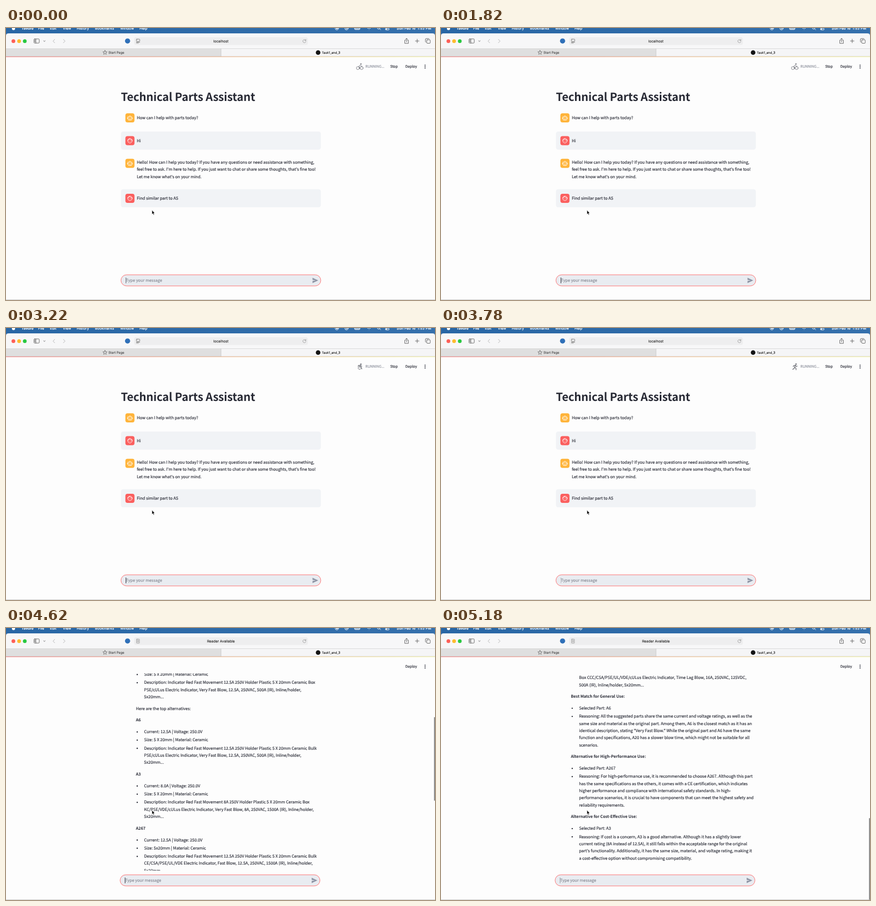
An HTML page for the animation above (5320 ms loop, 800 by 507 pixels).

```html
<!DOCTYPE html>
<html lang="en">
<head>
<meta charset="utf-8">
<title>Technical Parts Assistant</title>
<style>
  html, body { margin: 0; width: 100%; height: 100%; overflow: hidden; background: #fdfdfd; }
  svg { display: block; width: 100%; height: 100%; }
  text { white-space: pre; text-rendering: geometricPrecision; }
  .ui { font-family: Inter, "Liberation Sans", sans-serif; }
  .page { font-family: "Noto Sans CJK SC", "Noto Sans CJK JP", "Noto Sans", sans-serif; }
  .line { fill: none; stroke-linecap: round; stroke-linejoin: round; }
</style>
</head>
<body>
<svg id="stage" viewBox="0 0 800 507">
  <defs>
    <clipPath id="view"><rect x="0" y="84.5" width="797" height="367.8"/></clipPath>
    <linearGradient id="sky"><stop offset="0" stop-color="#2866a5"/><stop offset="1" stop-color="#3570ac"/></linearGradient>
    <linearGradient id="ribbon"><stop offset="0" stop-color="#ff4b4b"/><stop offset="1" stop-color="#fffd80"/></linearGradient>
    <g id="bot">
      <rect width="17" height="17" rx="4" fill="#ffb43a"/>
      <g class="line" stroke="#fff" stroke-width=".85">
        <path d="M5 6.2H12V11.2Q12 12.8 10.4 12.8H6.6Q5 12.8 5 11.2ZM8.5 6V4.2M3.7 8.3V10M13.3 8.3V10M7 11H10"/>
        <path d="M6.9 8.6h.1M10 8.6h.1" stroke-width="1.2"/>
      </g>
    </g>
    <g id="user">
      <rect width="17" height="17" rx="4" fill="#fb5f5e"/>
      <g class="line" stroke="#fff" stroke-width=".85">
        <circle cx="8.5" cy="8.7" r="4.2"/>
        <path d="M4.5 7.8Q6.7 7.6 7.5 5.2Q9.2 7.7 12.5 7.3"/>
        <path d="M7 9.7h.1M10 9.7h.1" stroke-width="1.1"/>
      </g>
    </g>
  </defs>
  <rect width="800" height="507" fill="#fdfdfd"/>

  <g id="menu" class="ui">
    <rect width="800" height="16" fill="url(#sky)"/>
    <circle cx="14" cy="1" r="3" fill="#fff"/>
    <g class="line" stroke="#fff" stroke-width=".9">
      <circle cx="617" cy="0.4" r="3.2"/><circle cx="617" cy="0.4" r="1.2" fill="#fff"/>
      <circle cx="635" cy="0.4" r="3.2"/><path d="M634.3 -1.1V1.9L636.6 .4Z"/>
      <rect x="650" y="-2.1" width="10" height="5" rx="1.4" fill="#fff" fill-opacity=".5"/>
      <path d="M674.5 .6Q677 -1.2 679.5 .6M677 2.8h.1"/>
      <circle cx="695" cy="-.3" r="2.4"/><path d="M696.8 1.5L698.7 3.4"/>
      <rect x="707.5" y=".8" width="7" height="2.8" rx="1.4"/><path d="M709.2 2.2h.2" stroke-width="1.8"/>
    </g>
  </g>

  <g id="chrome" class="ui">
    <path d="M0 53V14.4Q0 10.1 5 10.1H795Q800 10.1 800 14.4V53Z" fill="#f7f7f8"/>
    <circle cx="13.8" cy="24.4" r="3.5" fill="#fe5f57"/>
    <circle cx="24.4" cy="24.4" r="3.5" fill="#febc2e"/>
    <circle cx="35" cy="24.4" r="3.5" fill="#28c840"/>
    <rect x="239" y="17.3" width="324" height="14.3" rx="3.6" fill="#eeeeef"/>
    <circle cx="226.7" cy="24.2" r="4.8" fill="#2f70b8"/>
    <rect y="38.5" width="401" height="14.7" fill="#dfdfdf"/>
    <rect x="401" y="38.5" width="399" height="14.7" fill="#f5f5f6"/>
    <path d="M0 38.5H800" stroke="#d0d0d0" stroke-width=".7"/>
    <path d="M401 38.5V53" stroke="#c2c2c2" stroke-width=".7"/>
    <path d="M0 53.1H800" stroke="#a8a8a8" stroke-width=".6"/>
    <rect y="53.3" width="800" height=".9" fill="url(#ribbon)" opacity=".75"/>
    <g class="line" stroke="#555" stroke-width=".85">
      <rect x="52.2" y="20.3" width="9.8" height="7.8" rx="1.3"/>
      <path d="M55.7 20.5V28M53.4 22.3h1M53.4 24h1M53.4 25.7h1"/>
      <path d="M70.1 23.7L71.6 25.2L73.1 23.7"/>
      <path d="M90.8 21.2L87.7 24.4L90.8 27.6M107 21.2L110.1 24.4L107 27.6" stroke="#b6b6b6" stroke-width="1"/>
      <path d="M559 23.1A2.9 2.9 0 1 0 559.3 25.2M559.2 21.2V23.3H557.1" stroke="#777" stroke-width=".6"/>
      <path d="M745.2 22.8H743.6V28.7H750.4V22.8H748.8M747 26V19.4M745.1 21.1L747 19.2L748.9 21.1"/>
      <path d="M763.4 24.2H770.2M766.8 20.8V27.6"/>
      <rect x="784.6" y="22" width="6.5" height="6.5" rx="1.2"/>
      <path d="M782.9 26.6Q782.2 26.5 782.2 25.4V21Q782.2 19.7 783.5 19.7H787.8Q789 19.7 789.1 20.4"/>
      <path id="star" stroke-width=".7"/>
    </g>
    <circle cx="582" cy="45.7" r="4.3" fill="#151515"/>
    <g id="siteIcon" class="line" stroke="#666" stroke-width=".75">
      <rect x="243.2" y="20.8" width="6.2" height="4.2" rx=".8"/><path d="M243.2 26.5H249.4M243.2 28H247"/>
    </g>
    <g id="readIcon" class="line" stroke="#777" stroke-width=".6">
      <rect x="243.4" y="20.7" width="5.4" height="7.6" rx=".8"/><path d="M244.8 22.7h2.6M244.8 24.4h2.6M244.8 26.1h2.6"/>
    </g>
  </g>

  <g id="chat" class="page">
    <rect x="214.3" y="193" width="372.8" height="33.8" rx="4.2" fill="#f1f3f6"/>
    <rect x="214.3" y="300.4" width="372.8" height="33.8" rx="4.2" fill="#f1f3f6"/>
    <use href="#bot" x="222.6" y="159"/>
    <use href="#user" x="222.6" y="201.4"/>
    <use href="#bot" x="222.6" y="243.7"/>
    <use href="#user" x="222.6" y="308.9"/>
    <g class="line" stroke="#62646c" stroke-width=".9">
      <g id="bike">
        <circle cx="656.2" cy="74.7" r="2.8" stroke-width=".75"/><circle cx="663.2" cy="74.7" r="2.8" stroke-width=".75"/>
        <circle cx="661.8" cy="67.2" r=".8" fill="#62646c"/>
        <path d="M659.7 75.8V73.4L657.7 71.7L660.4 69.3L662 71.2H664"/>
      </g>
      <g id="chair">
        <circle cx="661.8" cy="67.5" r=".9" fill="#62646c"/>
        <path d="M661 69.2L659.2 72.7H662.2L663.5 76.3M660.6 69.8L657.5 69.5L656.7 71.5M661 70L663.5 71.3" stroke-width="1.2"/>
        <path d="M657.8 72.2A2.7 2.7 0 1 0 661.9 75.3"/>
      </g>
      <g id="run">
        <circle cx="662" cy="67.3" r=".9" fill="#62646c"/>
        <path d="M660.8 69.2L659.3 73L661.8 74.8L662.2 77.8M659.3 73L658.5 75.6L655.8 77M660.8 69.5L657.7 70L656.8 72M661 69.7L662.5 71.6L664.4 71" stroke-width="1.2"/>
      </g>
    </g>
  </g>

  <g id="answer" class="page">
    <g clip-path="url(#view)"><g id="scroll"></g></g>
    <rect id="thumb" x="798.2" width="1.8" height="156" rx=".9" fill="#858585"/>
  </g>

  <g id="header" class="page" fill="#31333f">
    <circle cx="781.5" cy="69.2" r=".95"/><circle cx="781.5" cy="72" r=".95"/><circle cx="781.5" cy="74.8" r=".95"/>
  </g>

  <g id="input" class="page">
    <rect x="214.4" y="460" width="372.6" height="20.8" rx="10.4" fill="#e9ecf1" stroke="#ff5555" stroke-width=".8"/>
    <path d="M571.6 465.4L582.2 470.5L571.6 475.6V471.6L577.5 470.5L571.6 469.4Z" fill="#8f95a5"/>
    <rect id="caret" x="223.2" y="465.2" width="1" height="10.6" fill="#22242e"/>
  </g>
  <path d="M272.2 339.6V347.3L273.9 345.8L275.1 348.5L276.4 347.9L275.2 345.3H277.5Z" fill="#000" stroke="#fff" stroke-width=".6"/>
  <path d="M0 506.6H800" stroke="#b9b9b9" stroke-width=".8"/>
</svg>
<script>
const $ = id => document.getElementById(id);
const INK = '#272934', BODY = 7.59, STRONG = 7.48, SMALL = 6.64;

function put(parent, tag, attrs, str) {
  const node = document.createElementNS('http://www.w3.org/2000/svg', tag);
  for (const key in attrs) node.setAttribute(key, attrs[key]);
  if (str) node.textContent = str;
  return $(parent).appendChild(node);
}
// y is the middle of the capitals; a hairline stroke thickens the small type
function label(parent, x, y, str, size = BODY, more = {}) {
  const fill = more.fill || INK;
  return put(parent, 'text', {
    x, y: y + size * .37, 'font-size': size, fill, stroke: fill, 'stroke-width': .15, ...more
  }, str);
}
const bold = { 'font-weight': 700, 'stroke-width': 0 };

// Menu bar and browser controls
[[29, 'Tavuro'], [60, 'File'], [82, 'Edit'], [106, 'View'], [132, 'History'],
 [166, 'Bookmarks'], [213, 'Window'], [249, 'Help']].forEach(([x, str], i) =>
  label('menu', x, .9, str, 6.6, { fill: '#fff', 'font-weight': i ? 500 : 700 }));
label('menu', 793, .9, 'Sun Feb 16  1:53 PM', 6.8, { fill: '#fff', 'text-anchor': 'end', 'font-weight': 500 });
label('chrome', 191, 45.9, 'Start Page', 6, { fill: '#555' });
label('chrome', 589, 45.9, 'Task1_and_3', 5.85, { fill: '#222' });
const middle = { 'text-anchor': 'middle', fill: '#333' };
const site = label('chrome', 400.8, 24.5, 'localhost', 6.6, middle);
const reader = label('chrome', 400.8, 24.5, 'Reader Available', 6.6, middle);
const points = Array.from({ length: 10 }, (_, i) => {
  const r = i % 2 ? 1.8 : 4.2, a = i * Math.PI / 5;
  return (184.6 + r * Math.sin(a)).toFixed(2) + ' ' + (45.8 - r * Math.cos(a)).toFixed(2);
});
$('star').setAttribute('d', 'M' + points.join('L') + 'Z');

// Conversation
label('chat', 214.2, 128.4, 'Technical Parts Assistant', 20.87, { ...bold, 'letter-spacing': -.117 });
[[167.3, 'How can I help with parts today?'],
 [209.7, 'Hi'],
 [250.3, 'Hello! How can I help you today? If you have any questions or need assistance with something,'],
 [263.6, "feel free to ask. I'm here to help. If you just want to chat or share some thoughts, that's fine too!"],
 [276.9, "Let me know what's on your mind."],
 [317.2, 'Find similar part to A5']].forEach(([y, str]) => label('chat', 243.9, y, str));
label('chat', 670.3, 71.8, 'RUNNING...', SMALL, { fill: '#8d909c' });
const stop = label('header', 716.4, 71.8, 'Stop', SMALL);
label('header', 744.8, 71.8, 'Deploy', SMALL);
label('input', 223.6, 470.5, 'Type your message', BODY, { fill: '#868993' });

// Long answer: strings are paragraphs, arrays are bullet points
const part = (name, amps, size, ...lines) => [name,
  [`Current: ${amps}A | Voltage: 250.0V`], [`Size: ${size} | Material: Ceramic`], lines];
const wide = '5 X 20mm', tight = '5x20mm', end = '5x20mm...';
const fast = 'Description: Indicator Red Fast Movement ';
const blocks = [
  ['Size: 5 X 20mm | Material: Ceramic'],
  [fast + '12.5A 250V Holder Plastic 5 X 20mm Ceramic Box',
   'PSE/cULus Electric Indicator, Very Fast Blow, 12.5A, 250VAC, 500A (IR), Inline/holder,', end],
  'Here are the top alternatives:',
  ...part('A6', '12.5', wide, fast + '12.5A 250V Holder Plastic 5 X 20mm Ceramic Bulk',
    'PSE/cULus Electric Indicator, Very Fast Blow, 12.5A, 250VAC, 500A (IR), Inline/holder,', end),
  ...part('A3', '8.0', wide, fast + '8A 250V Holder Plastic 5 X 20mm Ceramic Box',
    'KC/PSE/VDE/cULus Electric Indicator, Very Fast Blow, 8A, 250VAC, 1500A (IR), Inline/holder,', end),
  ...part('A267', '12.5', tight, fast + '12.5A 250V Holder Plastic 5 X 20mm Ceramic Bulk',
    'CE/CSA/PSE/UL/VDE Electric Indicator, Fast Blow, 12.5A, 250VAC, 1500A (IR), Inline/holder,', end),
  ...part('A268', '12.5', tight, fast + '12.5A 250V Holder Plastic 5 X 20mm Ceramic Box',
    'CE/CSA/PSE/UL/VDE Electric Indicator, Fast Blow, 12.5A, 250VAC, 1500A (IR), Inline/holder,', end),
  ...part('A20', '16.0', tight,
    'Description: Indicator Red Slow Blow Movement 16A 250V Holder Plastic 5 X 20mm Ceramic',
    'Box CCC/CSA/PSE/UL/VDE/cULus Electric Indicator, Time Lag Blow, 16A, 250VAC, 125VDC,',
    '500A (IR), Inline/holder, 5x20mm...'),
  'Best Match for General Use:', ['Selected Part: A6'],
  ['Reasoning: All the suggested parts share the same current and voltage ratings, as well as the',
   'same size and material as the original part. Among them, A6 is the closest match as it has an',
   'identical description, stating "Very Fast Blow." While the original part and A6 have the same',
   'function and specifications, A20 has a slower blow time, which might not be suitable for all',
   'scenarios.'],
  'Alternative for High-Performance Use:', ['Selected Part: A267'],
  ['Reasoning: For high-performance use, it is recommended to choose A267. Although this part',
   'has the same specifications as the others, it comes with a CE certification, which indicates',
   'higher performance and compliance with international safety standards. In high-',
   'performance scenarios, it is crucial to have components that can meet the highest safety and',
   'reliability requirements.'],
  'Alternative for Cost-Effective Use:', ['Selected Part: A3'],
  ['Reasoning: If cost is a concern, A3 is a good alternative. Although it has a slightly lower',
   'current rating (8A instead of 12.5A), it still falls within the acceptable range for the original',
   "part's functionality. Additionally, it has the same size, material, and voltage rating, making it",
   'a cost-effective option without compromising compatibility.'],
];
let y = 71.05, inList = true;
for (const block of blocks) {
  const isList = Array.isArray(block);
  y += !isList ? 21.65 : inList ? 15.25 : 21.85;
  if (isList) {
    put('scroll', 'circle', { cx: 244.7, cy: y + .4, r: 1.2, fill: INK });
    block.forEach((str, i) => label('scroll', 257.5, y + i * 13.35, str));
    y += (block.length - 1) * 13.35;
  } else if (block.startsWith('Here')) {
    label('scroll', 242.2, y, block);
  } else {
    label('scroll', 242.2, y, block, STRONG, bold);
  }
  inList = isList;
}

// Motion
const LOOP = 5320, STEP = 140, ANSWER = 4620;
const offsets = [0, 265, 472, 535, 547.7];
const sports = 'brwbwrbwrbwrw';
const icons = { b: $('bike'), w: $('chair'), r: $('run') };
const show = (node, on) => node.setAttribute('visibility', on ? 'inherit' : 'hidden');

function draw(time) {
  const step = Math.floor(time % LOOP / STEP), t = step * STEP;
  const done = t >= ANSWER;
  show($('chat'), !done);
  show(stop, !done);
  show(site, !done);
  show($('siteIcon'), !done);
  show($('answer'), done);
  show(reader, done);
  show($('readIcon'), done);
  for (const key in icons) show(icons[key], !done && sports[step % sports.length] === key);

  const shift = done ? offsets[step - ANSWER / STEP] : 0;
  $('scroll').setAttribute('transform', `translate(0 ${-shift})`);
  $('thumb').setAttribute('y', 166 + shift * .3437);
  $('input').setAttribute('transform', `translate(${done ? -1.6 : 0} 0)`);
  const blink = .55 + .6 * Math.cos(2 * Math.PI * (t - 1800) / 1480);
  $('caret').setAttribute('opacity', Math.min(1, Math.max(0, blink)));
}

const start = performance.now();
function tick() {
  draw(performance.now() - start);
  requestAnimationFrame(tick);
}
tick();
</script>
</body>
</html>
```
